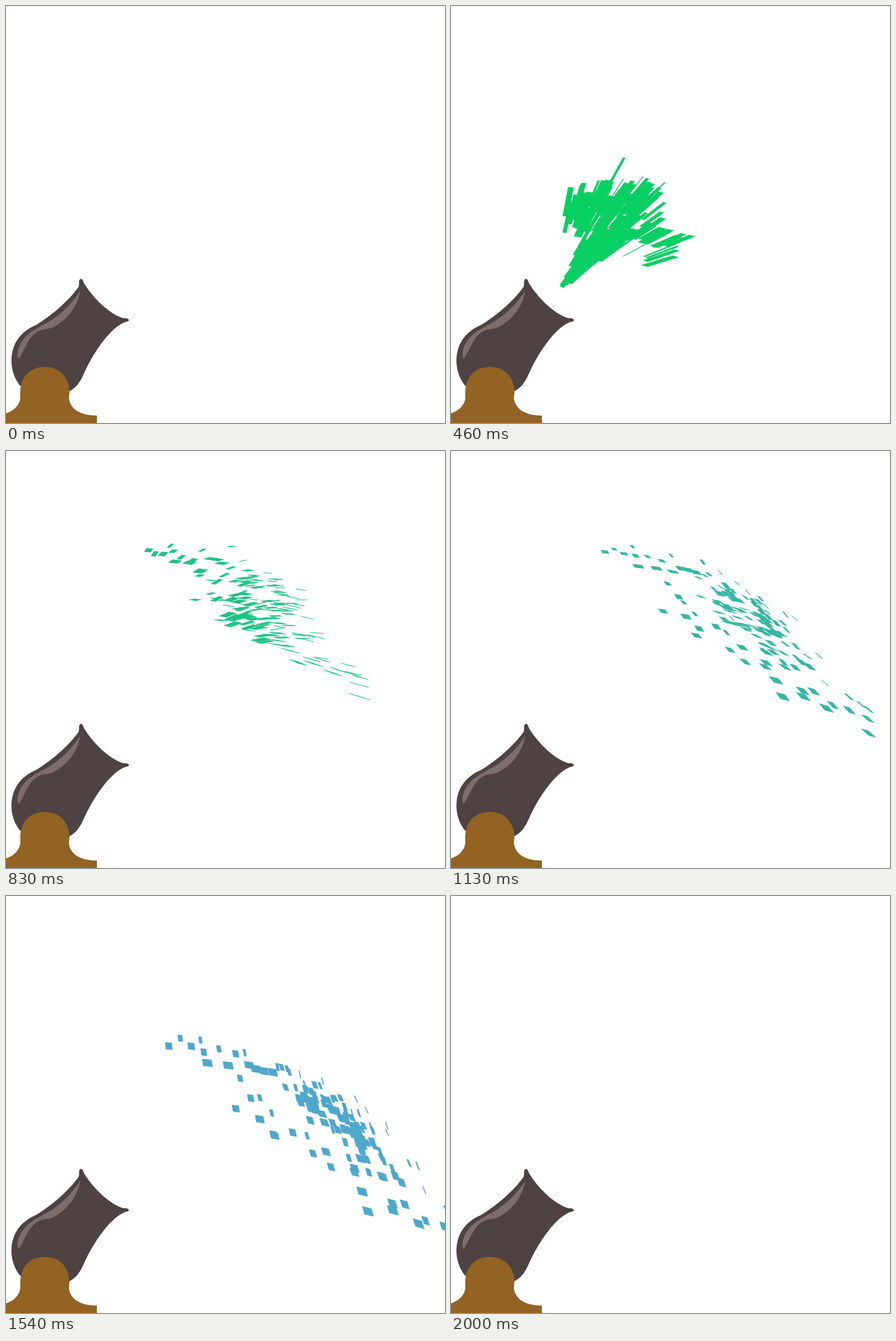
Recreate the animation shown at these times as an HTML page with a canvas. Size 768 px wide and 729 px high, loop 2080 ms.

```html
<!DOCTYPE html>
<html lang="en">
<head>
<meta charset="utf-8">
<title>Confetti cannon</title>
<style>
  html, body { margin: 0; width: 100%; height: 100%; overflow: hidden; background: #fff; }
  canvas { display: block; }
</style>
</head>
<body>
<canvas id="stage" width="768" height="729"></canvas>
<script>
const ctx = document.getElementById('stage').getContext('2d');
const LOOP = 2080, START = 130, FPS = 24, STEPS = 45;
const MUZZLE = { x: 174, y: 512 };
const DRAG = 1.85, AIM = 1.25;

let seed = 71;
function rnd() {
  seed = (seed * 16807) % 2147483647;
  return seed / 2147483647;
}
const bell = () => (rnd() + rnd() + rnd() + rnd() - 2) * 1.7;
const clamp = (v, a, b) => Math.max(a, Math.min(b, v));

// Blast: quick start, then slowed by drag
function reach(s) {
  if (s <= 0) return 0;
  const age = s * s / (s + 0.13);
  return 1 - Math.exp(-DRAG * age);
}

// Fall: sets in near half a second, then keeps a steady speed
const drop = s => 38 * Math.log(1 + Math.exp((s - 0.49) / 0.1));

function place(p, s) {
  const r = reach(s - p.delay);
  return {
    x: MUZZLE.x + p.vx * r,
    y: MUZZLE.y + p.vy * r + (r ? p.fall * drop(s) : 0)
  };
}

const pieces = [];

// Spreads pieces around a line that they reach at time AIM
function scatter({ n, from, to, spread, width, fall, late }) {
  const dx = to[0] - from[0], dy = to[1] - from[1], len = Math.hypot(dx, dy);
  for (let i = 0; i < n; i++) {
    const u = (i + rnd()) / n, side = bell();
    const x = from[0] + dx * u - dy / len * side * spread;
    const y = from[1] + dy * u + dx / len * side * spread;
    const delay = late[0] + (late[1] - late[0]) * rnd();
    const r = reach(AIM - delay);
    pieces.push({
      delay, fall,
      w: clamp(width * (1 + 0.4 * side + 0.8 * (rnd() - 0.5)), 1.2, width * 1.6),
      vx: (x - MUZZLE.x) / r,
      vy: (y - MUZZLE.y - fall * drop(AIM)) / r,
      tilt: 0.08 + clamp((x - 300) / 2000, 0, 0.2)
    });
  }
}

scatter({ n: 14, from: [282, 212], to: [460, 255], spread: 13, width: 10, fall: 1.1, late: [0.05, 0.13] });
scatter({ n: 34, from: [385, 298], to: [800, 560], spread: 20, width: 10, fall: 1, late: [0, 0.1] });
scatter({ n: 36, from: [450, 258], to: [690, 440], spread: 18, width: 7, fall: 1.1, late: [0, 0.2] });
scatter({ n: 62, from: [510, 290], to: [625, 390], spread: 14, width: 8, fall: 1.1, late: [0, 0.25] });

function color(s, w) {
  const t = s - 0.333 + (w < 3 ? 0.25 : 0);
  const r = clamp(8 + 66 * t, 0, 255);
  const g = clamp(208 - 37 * t, 0, 255);
  const b = clamp(98 + 98 * t, 0, 255);
  return `rgb(${r | 0},${g | 0},${b | 0})`;
}

// A slanted quad: one side is its width, the other its path during the exposure
function drawPiece(p, s) {
  if (s < p.delay) return;
  const half = (0.041 + 0.06 * Math.exp(-3 * s)) / 2;
  const a = place(p, s - half), b = place(p, s + half);
  const ux = p.w / 2 * Math.min(1, 0.5 + s), uy = ux * p.tilt;
  ctx.fillStyle = ctx.strokeStyle = color(s, p.w);
  ctx.beginPath();
  ctx.moveTo(a.x - ux, a.y - uy);
  ctx.lineTo(a.x + ux, a.y + uy);
  ctx.lineTo(b.x + ux, b.y + uy);
  ctx.lineTo(b.x - ux, b.y - uy);
  ctx.closePath();
  ctx.fill();
  ctx.lineWidth = 0.7;
  ctx.stroke();
}

const barrel = new Path2D(`M127 491 C129 486 126 478 131 477 C135 477 135 483 138 487
  C153 511 181 539 206 546 C211 545 215 547 215 550 C213 552 209 552 205 554
  C178 567 150 612 137 641 C130 658 122 668 110 674 L25 664
  C5 640 6 605 19 585 C28 571 40 563 52 558 C80 541 110 515 127 491Z`);
const shine = new Path2D(`M130 497 C126 525 106 549 87 559 C79 565 67 564 60 567
  C39 575 34 601 22 617 C18 610 20 598 28 586 C38 570 55 564 65 557
  C86 548 115 523 130 497Z`);
const base = new Path2D(`M25 676 C25 650 40 631 68 631 C97 631 111 652 111 676
  L110 685 C112 705 130 716 159 716 V729 H0 V712 C15 708 26 695 25 682Z`);

function fill(path, style) {
  ctx.fillStyle = style;
  ctx.fill(path);
}

function draw(ms) {
  const tick = Math.floor(ms / 10) * 10 + 10 - START;
  const step = Math.ceil(tick * FPS / 1000) - 1;
  ctx.fillStyle = '#fff';
  ctx.fillRect(0, 0, 768, 729);
  if (step >= 0 && step < STEPS) {
    for (const p of pieces) drawPiece(p, step / FPS);
  }
  fill(barrel, '#4e4342');
  fill(shine, '#7d6d6d');
  fill(base, '#926322');
}

const begin = performance.now();
function frame() {
  draw((performance.now() - begin) % LOOP);
  requestAnimationFrame(frame);
}
frame();
</script>
</body>
</html>
```
